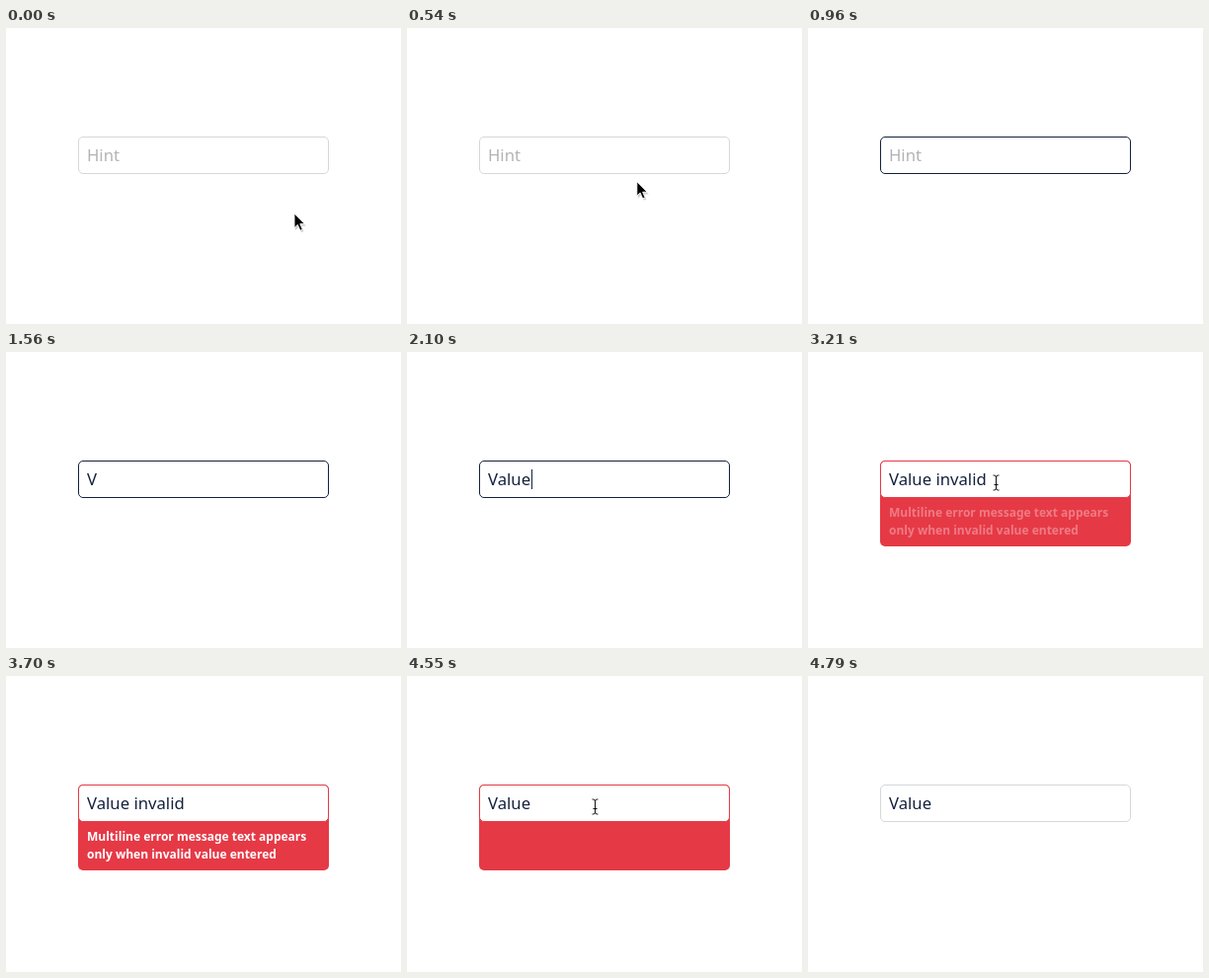
Animation, 400 px wide and 300 px high, one loop 5360 ms. Source, as an HTML page:

```html
<!DOCTYPE html>
<html lang="en">
<head>
<meta charset="utf-8">
<title>Input field with error message</title>
<style>
  html, body { margin: 0; height: 100%; overflow: hidden; background: #fff; }
  svg { display: block; width: 400px; height: 300px; }
  text { font-family: "Noto Sans", "Open Sans", sans-serif; white-space: pre; }
  .value { font-size: 16.7px; font-weight: 500; }
  .error { font-size: 12px; font-weight: 600; fill: #fff; }
</style>
</head>
<body>
<svg viewBox="0 0 400 300">
  <rect id="panel" x="73" y="110" width="254" rx="5" fill="#e63946"/>
  <rect id="field" x="73.5" y="110.5" width="253" height="37" rx="4.5" fill="#fff"/>
  <text id="value" class="value" x="82" y="135"></text>
  <rect id="caret" y="119" width="1" height="20" fill="#14213d"/>
  <g id="message" class="error">
    <text x="82" y="167">Multiline error message text appears</text>
    <text x="82" y="185">only when invalid value entered</text>
  </g>
  <g id="arrow">
    <path d="M1 2V17L4.5 13.8 7 19.2 9.6 18 7.2 12.8H12Z" fill="#000" opacity=".18"/>
    <path d="M0 0V14.5L3.3 11.4 5.9 17.3 8.3 16.2 5.8 10.6H10.4Z" stroke="#fff" stroke-width=".9"/>
  </g>
  <g id="beam" fill="none">
    <path id="beamShape" d="M-3-7.5H-2Q0-7.5 0-5.5Q0-7.5 2-7.5H3M0-5.5V5.5M-3 7.5H-2Q0 7.5 0 5.5Q0 7.5 2 7.5H3M-2 2H2" stroke="#fff" stroke-width="2.4"/>
    <use href="#beamShape" style="stroke:#000"/>
    <path d="M-3-7.5H-2Q0-7.5 0-5.5Q0-7.5 2-7.5H3M0-5.5V5.5M-3 7.5H-2Q0 7.5 0 5.5Q0 7.5 2 7.5H3M-2 2H2" stroke="#111"/>
  </g>
</svg>
<script>
const LOOP = 5360, STEP = 30, TEXT = "Value invalid";
const GREY = [214, 215, 217], HOVER = [160, 163, 172], NAVY = [20, 33, 61], RED = [230, 57, 70];
const $ = id => document.getElementById(id);
const show = (id, on) => $(id).style.display = on ? "" : "none";
const within = (t, a, b) => t >= a && t < b;

// Progress from a to b, advancing in whole animation steps
const ramp = (t, a, b) =>
  Math.min(1, Math.max(0, Math.floor((t - a) / STEP + 1e-6) * STEP / (b - a)));
const ease = p => p * p * (3 - 2 * p);
const mix = (a, b, p) => a + (b - a) * p;
const count = (t, start, gap, max) =>
  Math.max(0, Math.min(max, Math.floor((t - start) / gap) + 1));

function typed(t) {
  return count(t, 1560, 60, 5) + count(t, 2250, 60, 8) - count(t, 4000, 70, 8);
}

function borderColor(t) {
  const fades = [[HOVER, 600, 750], [NAVY, 870, 960], [RED, 2940, 3090], [GREY, 4640, 4790]];
  return fades.reduce((c, [to, a, b]) => c.map((v, i) => mix(v, to[i], ramp(t, a, b))), GREY);
}

function drawCaret(t, x) {
  const blink = (start, times) => within(t, start, start + times * 180 - 90) &&
    Math.floor((t - start) / 90) % 2 === 0;
  show("caret", blink(1020, 3) || blink(1920, 2) || within(t, 3800, 3900));
  $("caret").setAttribute("x", x);
}

function drawPointer(t) {
  const p = ease(ramp(t, 240, 780));
  const x = mix(292, 190.5, p), y = mix(188, 132.5, p);
  const over = y < 148;
  show("arrow", t < 810 && !over);
  show("beam", (t < 810 && over) || within(t, 2850, 3700) || within(t, 4490, 4790));
  for (const id of ["arrow", "beam"]) $(id).setAttribute("transform", `translate(${x} ${y})`);
}

function draw(t) {
  const n = typed(t), hint = t < 1500;
  $("value").textContent = hint ? "Hint" : TEXT.slice(0, n);
  $("value").setAttribute("fill", hint ? "#b3b3b3" : "#14213d");
  $("field").setAttribute("stroke", `rgb(${borderColor(t).map(Math.round)})`);

  const open = ramp(t, 3090, 3180) - ramp(t, 4550, 4640);
  show("panel", open > 0);
  $("panel").setAttribute("height", 38 + 49 * open);
  $("message").setAttribute("opacity", ramp(t, 3180, 3270) - ramp(t, 4460, 4550));

  drawCaret(t, n === 0 ? 82 : n === 5 ? 126 : 184);
  drawPointer(t);
}

const start = performance.now();
function frame() {
  draw((performance.now() - start) % LOOP);
  requestAnimationFrame(frame);
}
frame();
</script>
</body>
</html>
```
